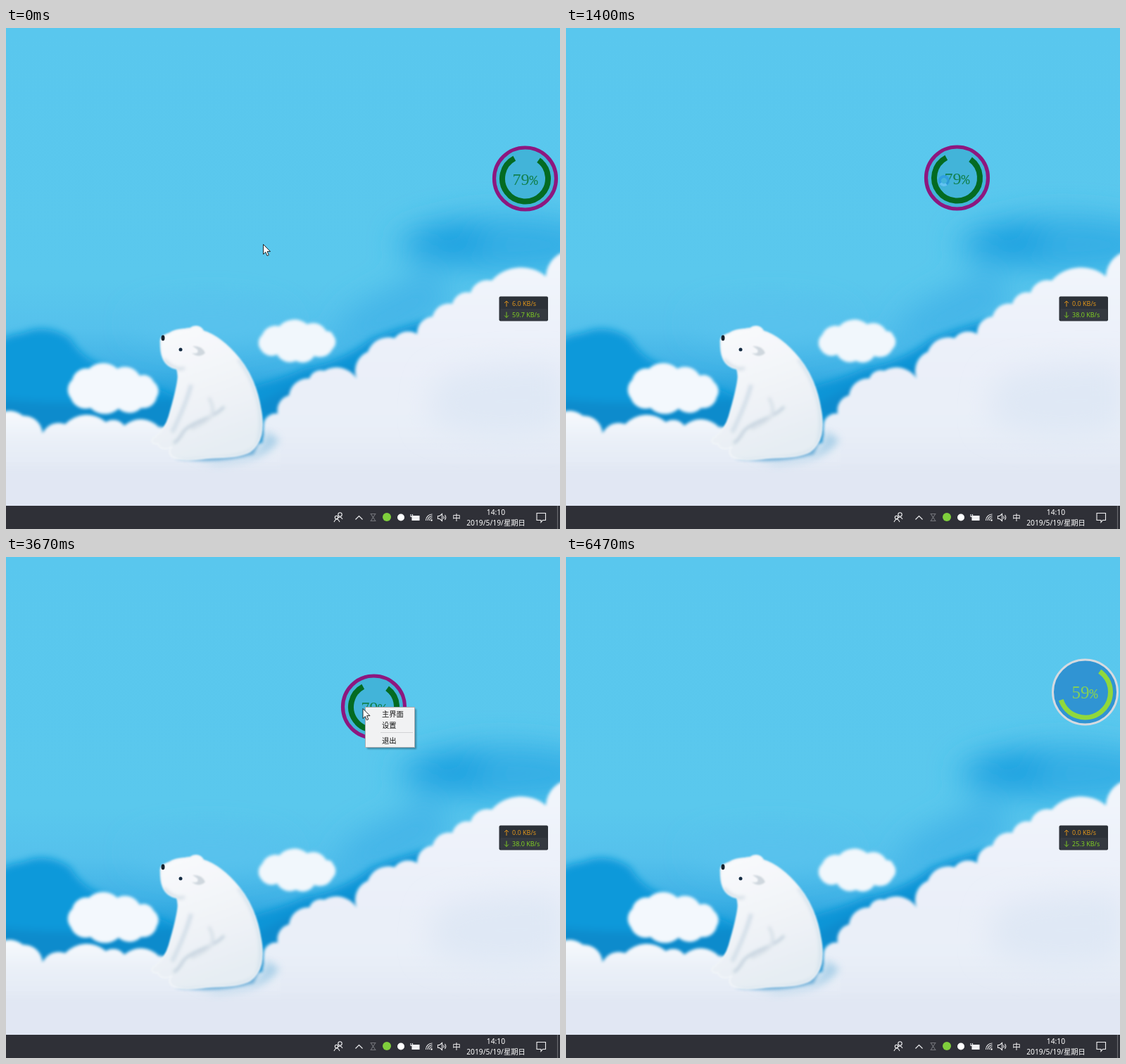
An HTML page that plays this animation: 787x712 px, repeating every 6.51 s.

```html
<!DOCTYPE html>
<html lang="zh-CN">
<head>
<meta charset="utf-8">
<title>Desktop widget</title>
<style>
html, body { margin: 0; width: 100%; height: 100%; overflow: hidden; background: #5ac7ee; }
svg { position: absolute; left: 0; top: 0; width: 787px; height: 712px; }
text { font-family: "Noto Sans", "Noto Sans CJK SC", "Noto Sans CJK", sans-serif; }
.net { font: 9px "Liberation Sans", sans-serif; }
.menu text { font: 10.3px "Noto Sans CJK SC", "Noto Sans CJK", sans-serif; fill: #111; }
.pct { font: 24px "Liberation Serif", serif; }
.pct .sign { font: 20px "Liberation Mono", monospace; }
.bar text { font-size: 10.3px; fill: #fff; text-anchor: middle; }
.icon { fill: none; stroke: #f2f2f4; stroke-width: 1.1; }
</style>
</head>
<body>
<svg viewBox="0 0 787 712">
  <defs>
    <linearGradient id="sky" x2="0" y2="1">
      <stop offset="0" stop-color="#59c7ee"/>
      <stop offset=".5" stop-color="#5ac8ed"/>
      <stop offset=".6" stop-color="#55c1ec"/>
      <stop offset=".68" stop-color="#40b2e6"/>
      <stop offset=".77" stop-color="#0f94d5"/>
    </linearGradient>
    <linearGradient id="mist" gradientUnits="userSpaceOnUse" x1="0" y1="340" x2="0" y2="640">
      <stop offset="0" stop-color="#f1f5fb"/>
      <stop offset=".4" stop-color="#ebf0f9"/>
      <stop offset=".75" stop-color="#e9eff8"/>
      <stop offset="1" stop-color="#e1e7f3"/>
    </linearGradient>
    <linearGradient id="bank" gradientUnits="userSpaceOnUse" x1="0" y1="545" x2="0" y2="645">
      <stop offset="0" stop-color="#f7fafd"/>
      <stop offset=".4" stop-color="#eaf0f8"/>
      <stop offset="1" stop-color="#e1e7f3"/>
    </linearGradient>
    <linearGradient id="fur" x2=".3" y2="1">
      <stop offset="0" stop-color="#fafbfd"/>
      <stop offset=".6" stop-color="#f0f3f7"/>
      <stop offset="1" stop-color="#e6edf3"/>
    </linearGradient>
    <filter id="b1" x="-20%" y="-20%" width="140%" height="140%"><feGaussianBlur stdDeviation="1.1"/></filter>
    <filter id="b2" x="-20%" y="-20%" width="140%" height="140%"><feGaussianBlur stdDeviation="2"/></filter>
    <filter id="b5" x="-50%" y="-50%" width="200%" height="200%"><feGaussianBlur stdDeviation="6"/></filter>
    <filter id="b20" x="-60%" y="-60%" width="220%" height="220%"><feGaussianBlur stdDeviation="20"/></filter>
    <clipPath id="bearClip"><use href="#bear"/></clipPath>
  </defs>

  <rect width="787" height="712" fill="url(#sky)"/>

  <!-- deep blue haze -->
  <g filter="url(#b20)">
    <ellipse cx="705" cy="308" rx="150" ry="42" fill="#36afe5"/>
    <ellipse cx="635" cy="302" rx="50" ry="22" fill="#18a0e0"/>
    <path d="M490 400L600 340L640 390L560 440L450 470Z" fill="#45b6e8"/>
    <ellipse cx="290" cy="420" rx="110" ry="28" fill="#59c2ed"/>
  </g>
  <g filter="url(#b5)">
    <path d="M-20 452Q5 434 22 434Q60 418 92 442Q108 470 140 480Q190 500 245 525V600H-20Z" fill="#0799da"/>
    <path d="M-20 525Q80 540 245 525V600H-20Z" fill="#078bcc"/>
    <path d="M340 512Q390 500 425 483Q475 476 520 441Q560 425 600 415V520L370 580Z" fill="#0895d7"/>
    <path d="M350 540Q400 505 470 485L520 478L400 570Z" fill="#078bce"/>
  </g>

  <g id="clouds"></g>

  <!-- bear -->
  <path d="M238 612Q300 622 345 608Q372 593 368 572L388 585Q370 616 300 620Z" fill="#8fc3e2" opacity=".7" filter="url(#b5)"/>
  <path d="M240 612Q300 621 352 606L366 578L360 560L300 600Z" fill="#4b9ccf" opacity=".7" filter="url(#b2)"/>
  <g filter="url(#b1)">
    <path id="bear" fill="url(#fur)" stroke="#f0f4f8" stroke-width="2.500" d="M220 446C219 438 226 437 234 433C243 427 254 429 262 427C268 422 277 424 280 431C300 437 317 453 331 470C347 490 357 516 361 540C367 570 363 590 346 602C330 611 305 609 285 611C265 614 245 615 236 609C230 604 233 598 236 595C228 600 218 598 216 591C207 592 204 585 212 581C220 575 228 566 232 552C236 538 240 525 243 509C245 499 246 492 243 484C232 482 226 476 223 468C220 461 220 453 220 446Z"/>
    <g clip-path="url(#bearClip)" fill="none" filter="url(#b2)">
      <path d="M331 470C354 500 372 550 357 594C340 614 290 612 240 617" stroke="#d9e5ee" stroke-width="7"/>
      <path d="M310 538C295 556 258 560 250 577Q244 587 238 590" stroke="#c3d1dd" stroke-width="4"/>
      <path d="M263 507C256 535 245 555 236 575" stroke="#d4dfe9" stroke-width="6"/>
      <path d="M288 525C302 550 290 558 263 570" stroke="#dae2ea" stroke-width="5"/>
      <path d="M224 471Q240 489 254 483" stroke="#d8e1e9" stroke-width="5"/>
    </g>
    <path d="M265 452Q279 451 283 462Q274 470 264 462Q275 464 272 457Z" fill="#cfd7de"/>
  </g>
  <ellipse cx="223" cy="440.500" rx="2.500" ry="4" fill="#17222e"/>
  <circle cx="248" cy="457" r="2.500" fill="#142b42"/>

  <!-- taskbar -->
  <g class="bar">
    <rect y="679" width="787" height="33" fill="#2f3037"/>
    <g class="icon">
      <circle cx="474.500" cy="691.500" r="2.700"/>
      <path d="M470 698Q474.500 692 478 698M466 702Q470 694 474 702"/>
      <circle cx="469.500" cy="695.500" r="2.200"/>
      <path d="M496.500 698.500L501.500 693.500L506.500 698.500"/>
      <path d="M517.500 690.500H525.500M517.500 700.500H525.500M518.500 691L524.500 700M524.500 691L518.500 700" stroke="#74757b"/>
      <path d="M577 693.500H587V699.500H577ZM575 691V695M577.500 691V695M574.500 694.500H578" fill="#f2f2f4"/>
      <path d="M596.500 700A9 9 0 0 1 605.500 691M599 700A6.500 6.500 0 0 1 605.500 693.500M601.500 700A4 4 0 0 1 605.500 696"/>
      <path d="M613.500 693.500H616L619.500 690.500V700.500L616 697.500H613.500Z"/>
      <path d="M621.500 693.500Q623 695.500 621.500 697.500M623.500 692Q626 695.500 623.500 699"/>
      <path d="M754 689.500H766.500V699.500H762.500L760 702.500V699.500H754Z"/>
      <path d="M783.500 679V712" stroke="#6c6d73"/>
    </g>
    <circle cx="541" cy="695" r="6" fill="#7fcf3c"/>
    <circle cx="561" cy="695.500" r="5" fill="#fff"/>
    <circle cx="604.500" cy="699.500" r="1.200" fill="#fff"/>
    <text x="640" y="699.500" style="font-size:11.500px">中</text>
    <text x="696" y="692">14:10</text>
    <text x="696" y="707">2019/5/19/星期日</text>
  </g>
</svg>

<svg viewBox="0 0 787 712">
  <g class="net">
    <rect x="700.500" y="381.500" width="69.500" height="35" rx="2" fill="#2c3138"/>
    <rect x="702" y="399" width="67" height="16.500" rx="2" fill="#343940"/>
    <g fill="none">
      <path d="M711 396V388M708 391L711 388L714 391" stroke="#d9901a"/>
      <path d="M711 403.500V411.500M708 408.500L711 411.500L714 408.500" stroke="#7cc822"/>
    </g>
    <text id="up" x="719" y="395" fill="#e0951a"></text>
    <text id="down" x="719" y="411" fill="#80cf22"></text>
  </g>

  <g id="widget">
    <g id="purple">
      <circle r="44" fill="#42b4d9" stroke="#8d177f" stroke-width="5.200"/>
      <path id="arc79" fill="none" stroke="#046b22" stroke-width="8"/>
      <text class="pct" x="-18" y="8.500" fill="#12804f">79<tspan class="sign">%</tspan></text>
    </g>
    <g id="blue">
      <circle r="46" fill="#3094d3" stroke="#d5dae0" stroke-width="3"/>
      <path id="arc59" fill="none" stroke="#90d83c" stroke-width="7"/>
      <text class="pct" x="-19" y="9" fill="#85d056" style="font-size:25px">59<tspan class="sign">%</tspan></text>
    </g>
  </g>

  <g id="menu" class="menu">
    <rect x="513" y="216" width="70" height="57" opacity=".3" filter="url(#b1)"/>
    <rect x="510.500" y="213.500" width="70" height="57" fill="#f1f2f3" stroke="#a9acb0"/>
    <path d="M532 249.500H578" stroke="#d2d3d5"/>
    <text x="534" y="227">主界面</text>
    <text x="534" y="243">设置</text>
    <text x="534" y="264.500">退出</text>
  </g>

  <g id="cursor">
    <path id="arrow" d="M.5 .5V14.500L3.800 11.500L6 16.700L8.300 15.700L6.100 10.600H10.500Z" fill="#fff" stroke="#111" stroke-width=".9"/>
    <g id="busy" fill="none" stroke-width="4">
      <circle r="6" stroke="#2d9be0" opacity=".85"/>
      <path d="M0 -6A6 6 0 0 1 6 0" stroke="#62c3f2"/>
    </g>
  </g>
</svg>

<script>
const $ = id => document.getElementById(id);
const LOOP = 6510;

// Joins "x,y" notches with round bulges, as on a cloud's edge
function scallop(notches) {
  const [first, ...rest] = notches.split(' ').map(p => p.split(',').map(Number));
  let last = first;
  return 'M' + first + rest.map(p => {
    const r = 0.72 * Math.hypot(p[0] - last[0], p[1] - last[1]);
    last = p;
    return `A${r} ${r} 0 0 1 ${p}`;
  }).join('');
}
const soft = (blur, d, fill) => `<path d="${d}" fill="${fill}" filter="url(#b${blur})"/>`;

const ridge = scallop('366,562 386,548 402,522 431,498 452,487 498,498 514,460 552,441 584,435 606,410 634,392 660,376 690,359 767,353 805,316') + 'V690H360Z';
const bank = scallop('-15,553 24,551 52,576 84,563 142,560 168,565 217,567 245,590') + 'H390V690H-15Z';
const nearCloud = scallop('92,526 94,500 118,484 158,484 190,494 210,503 214,525 192,540 160,541 120,540 92,526');
const farCloud = scallop('362,457 364,436 388,424 428,421 455,431 465,437 464,456 438,466 412,473 385,464 362,457');

$('clouds').innerHTML =
  soft(2, ridge, 'url(#mist)') +
  soft(2, bank, 'url(#bank)') +
  soft(20, 'M610 500Q690 470 790 480V570Q690 600 600 560Z', '#dfe8f5') +
  soft(5, 'M-20 625H830V700H-20Z', '#e1e7f3') +
  soft(2, nearCloud, '#f3f8fd') +
  soft(2, farCloud, '#f1f7fc');

// Arc between two clock angles, in degrees from the top
function arc(r, from, to) {
  const at = deg => {
    const a = deg * Math.PI / 180;
    return `${r * Math.sin(a)} ${-r * Math.cos(a)}`;
  };
  return `M${at(from)}A${r} ${r} 0 1 1 ${at(to)}`;
}
$('arc79').setAttribute('d', arc(32.5, 36, 332));
$('arc59').setAttribute('d', arc(36, 35, 252));

const mix = (a, b, k) => a + (b - a) * k;
const span = (t, from, to) => Math.min(1, Math.max(0, (t - from) / (to - from)));

// Position on a route of [time, x, y] stops
function along(route, t) {
  let [time, x, y] = route[0];
  for (const [next, nx, ny] of route) {
    const k = span(t, time, next) || 0;
    x = mix(x, nx, k);
    y = mix(y, ny, k);
    time = next;
  }
  return [x, y];
}

const widgetRoute = [
  [700, 737.5, 214], [1100, 670.5, 213], [1400, 555.5, 213], [1850, 522.5, 213],
  [4450, 522.5, 213], [4830, 737.5, 196], [5000, 737.5, 192]
];
const cursorRoute = [
  [30, 365, 307], [700, 714, 217], [2300, 512, 217], [2650, 507, 213], [3670, 507, 213],
  [3930, 374, 683], [4130, 376, 683], [4450, 536, 215], [5270, 751, 194], [5770, -30, 480]
];

// While dragging, the cursor holds on to the widget
function cursorAt(t, [x, y]) {
  if (t >= 700 && t < 2300) return [x + mix(-23, -11, span(t, 1100, 1850)), y + 3.5];
  if (t >= 4450 && t < 5270) return [x + 13, y + 2];
  return along(cursorRoute, t);
}

const downloads = ['59.7', '38.0', '23.9', '38.0', '9.5', '30.9', '25.3'];

const place = (id, [x, y]) =>
  $(id).setAttribute('transform', `translate(${Math.round(x * 2) / 2} ${Math.round(y)})`);
const show = (id, on) => { $(id).style.display = on ? '' : 'none'; };
const speed = (id, value) => { $(id).textContent = value + ' KB/s'; };

function draw(now) {
  const t = Math.max(0, now - start) % LOOP;
  const widget = along(widgetRoute, t);
  place('widget', widget);
  place('cursor', cursorAt(t, widget));

  const reading = Math.floor((t + 145) / 955);
  speed('up', reading ? '0.0' : '6.0');
  speed('down', downloads[reading]);

  const busy = t >= 700 && t < 2300;
  show('busy', busy);
  show('arrow', !busy);
  $('busy').setAttribute('transform', `rotate(${t * 0.36 % 360})`);
  show('menu', t >= 2690 && t < 3930);
  show('purple', t < 6430);
  show('blue', t >= 6430);
  requestAnimationFrame(draw);
}

const start = performance.now();
draw(start);
</script>
</body>
</html>
```
